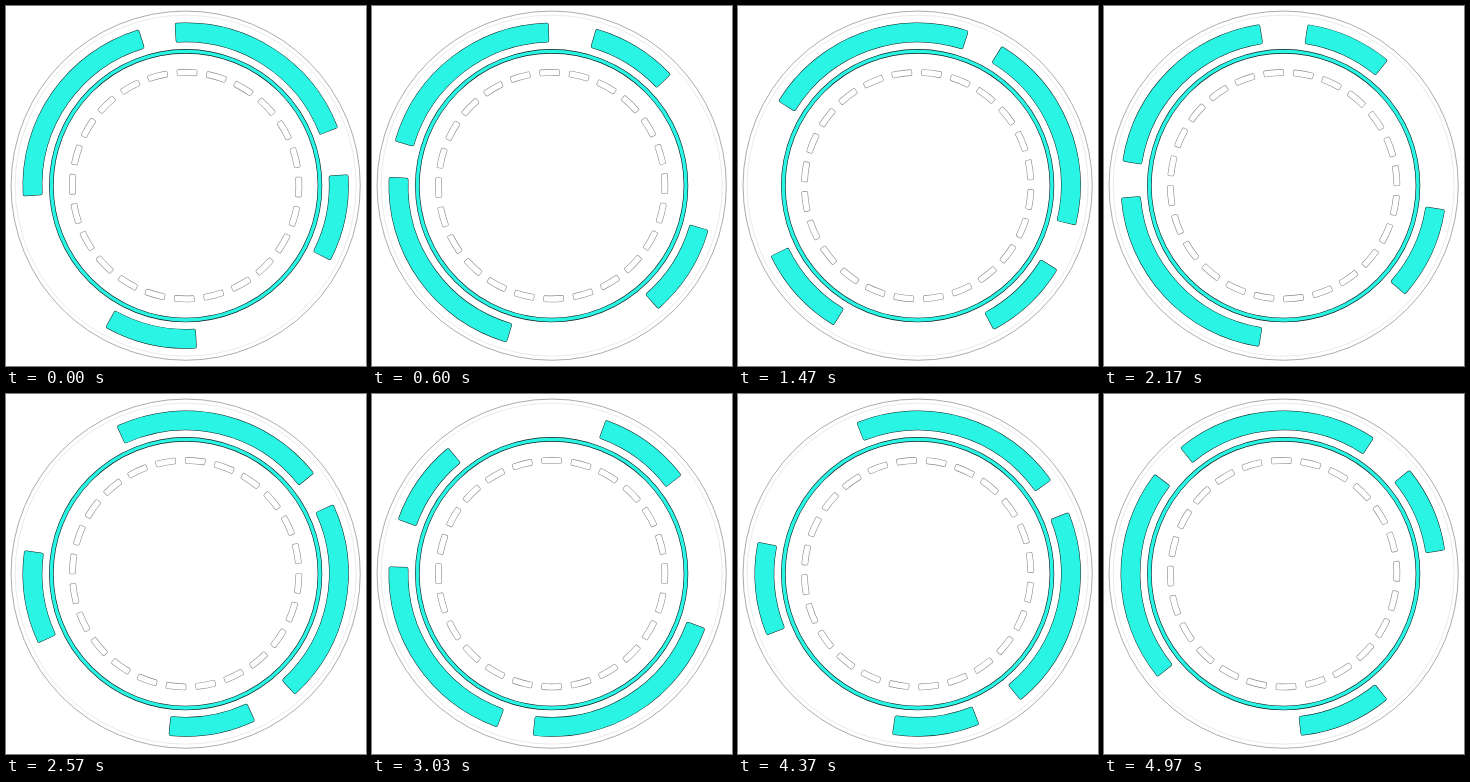
An HTML page with a canvas for the animation above (5 s loop, 360 by 360 pixels).

```html
<!DOCTYPE html>
<html>
<head>
<meta charset="utf-8">
<style>
html, body { margin: 0; width: 100%; height: 100%; overflow: hidden; background: #fff; }
canvas { display: block; }
</style>
</head>
<body>
<canvas id="dial" width="360" height="360"></canvas>
<script>
const ctx = document.getElementById('dial').getContext('2d');
const LOOP = 5000, STEPS = 150, CENTER = 179.65;
const CYAN = '#2af4e4', EDGE = '#0c2422';
const rad = deg => deg * Math.PI / 180;

// Poses in degrees at given steps of the loop
const steps = [0, 18, 44, 65, 91, 115, 149, 150];
const barTurn = [0, 289.7, 394.9, 642.4, 923.3, 1017.9, 1404.4, 1440];
const dashTurn = [0.7, 14, 37, 55, 75, 87, 118.8, 120.7];

// [start, span] of each bar
const bars = [[266.3, 72.8], [356.2, 31], [86.2, 33.2], [176.4, 76.8]];

// Smooth monotone interpolation, periodic at the ends
function pose(values, n) {
  const last = steps.length - 2;
  const slope = i => {
    const k = (i + last + 1) % (last + 1);
    return (values[k + 1] - values[k]) / (steps[k + 1] - steps[k]);
  };
  const tangent = i => {
    const a = slope(i - 1), b = slope(i);
    return 2 * a * b / (a + b);
  };
  let i = 0;
  while (i < last && n >= steps[i + 1]) i++;
  const h = steps[i + 1] - steps[i], u = (n - steps[i]) / h, v = 1 - u;
  return values[i] * v * v * (1 + 2 * u) + values[i + 1] * u * u * (3 - 2 * u)
    + h * u * v * (tangent(i) * v - tangent(i + 1) * u);
}

function ring(r, width, color) {
  ctx.beginPath();
  ctx.arc(0, 0, r, 0, 2 * Math.PI);
  ctx.lineWidth = width;
  ctx.strokeStyle = color;
  ctx.stroke();
}

// Ring segment with slightly rounded corners and a thin edge
function segment(inner, outer, from, to, round, fill, edge, edgeWidth) {
  const inset = round / ((inner + outer) / 2);
  const a = rad(from) + inset, b = rad(to) - inset;
  ctx.beginPath();
  ctx.arc(0, 0, outer - round, a, b);
  ctx.arc(0, 0, inner + round, b, a, true);
  ctx.closePath();
  ctx.lineJoin = 'round';
  ctx.lineWidth = 2 * (round + edgeWidth);
  ctx.strokeStyle = edge;
  ctx.stroke();
  ctx.lineWidth = 2 * round;
  ctx.strokeStyle = ctx.fillStyle = fill;
  ctx.stroke();
  ctx.fill();
}

function draw(now) {
  const n = Math.floor(now % LOOP * STEPS / LOOP + 0.15) % STEPS;
  ctx.setTransform(1, 0, 0, 1, 0, 0);
  ctx.fillStyle = '#fff';
  ctx.fillRect(0, 0, 360, 360);
  ctx.translate(CENTER, CENTER);

  ring(174.6, 0.7, '#888');
  ring(170.5, 0.6, '#dcdcdc');
  ring(134.3, 4.6, EDGE);
  ring(134.3, 3.4, CYAN);

  const turn = pose(barTurn, n);
  for (const [start, span] of bars)
    segment(143.8, 162.6, start + turn, start + turn + span, 1.5, CYAN, EDGE, 0.5);

  const shift = pose(dashTurn, n);
  for (let i = 0; i < 24; i++) {
    const mid = i * 15 + shift;
    segment(110.5, 116, mid - 4.9, mid + 4.9, 1, '#fff', '#8c8c8c', 0.6);
  }
}

const begin = performance.now();
function tick() {
  draw(performance.now() - begin);
  requestAnimationFrame(tick);
}
tick();
</script>
</body>
</html>
```
